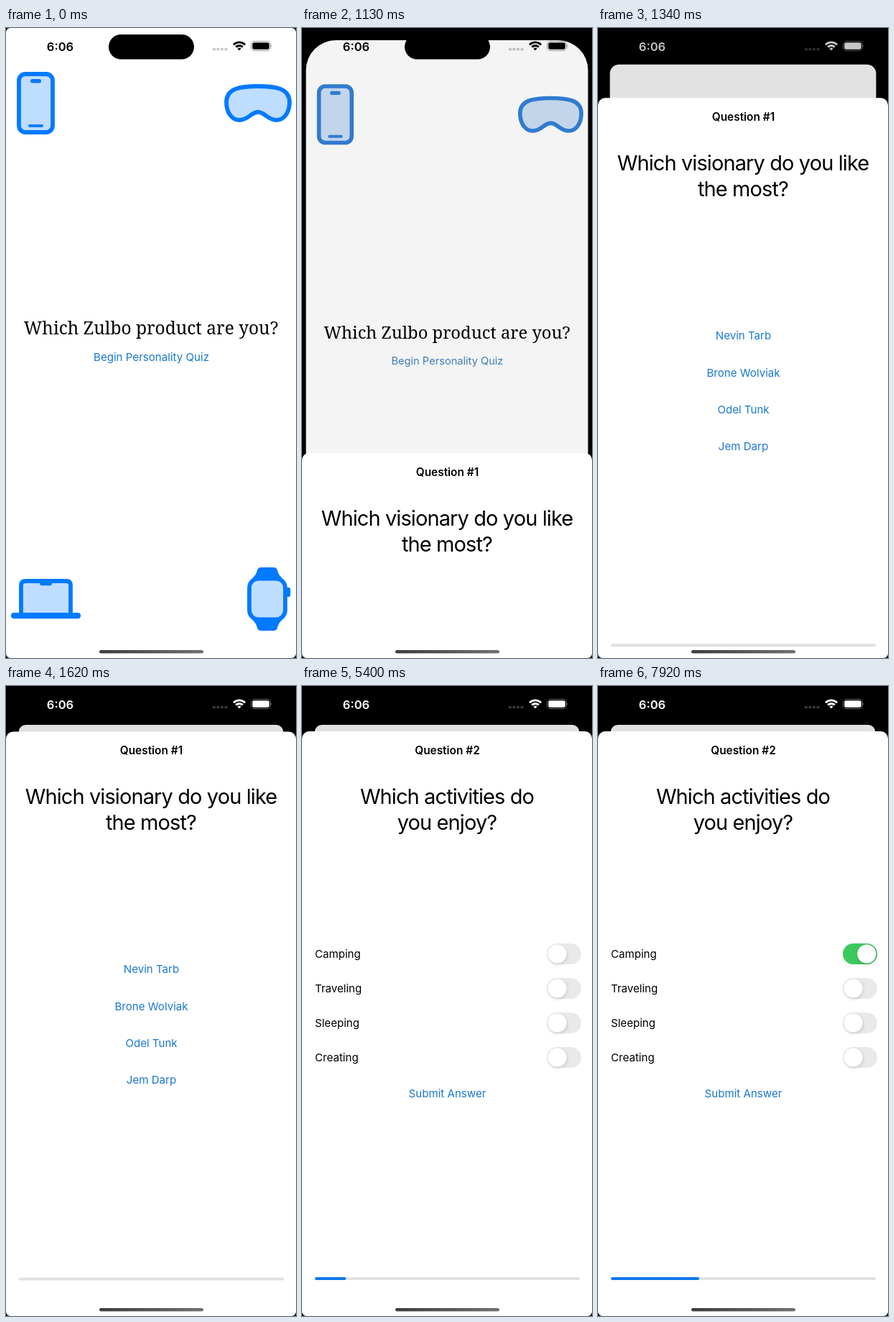
Recreate the animation shown at these times as an HTML page. Size 404 by 876 pixels, loop 7.99 s.

```html
<!DOCTYPE html>
<html lang="en">
<head>
<meta charset="utf-8">
<title>Personality quiz</title>
<style>
html, body { margin: 0; height: 100%; overflow: hidden; background: #000; }
svg { display: block; width: 100%; height: 100%; }
text { font: 15.1px Inter, sans-serif; font-optical-sizing: none; text-anchor: middle; }
.serif { font: 24.5px "Noto Serif", serif; }
.bar { font-size: 15.4px; font-weight: 600; }
.title { font-size: 29px; letter-spacing: -.9px; }
.label { text-anchor: start; }
.link { fill: #1a78d0; }
.glass { fill: currentColor; fill-opacity: .25; stroke: currentColor; stroke-width: 5.8; }
.knob { fill: #fff; filter: drop-shadow(1px 2px 2px #0002); }
</style>
</head>
<body>
<svg viewBox="0 0 404 876">
  <linearGradient id="shade"><stop stop-color="#3c3c3c"/><stop offset="1" stop-color="#707070"/></linearGradient>
  <rect width="404" height="876"/>
  <rect id="page" height="876" fill="#fff"/>
  <g id="home">
    <g fill="currentColor">
      <rect class="glass" x="18" y="64" width="47" height="81" rx="9"/>
      <rect x="34" y="71" width="15" height="5.4" rx="2.7"/>
      <rect x="31" y="134" width="21" height="4" rx="2"/>
      <path class="glass" d="M351 81C376 81 395 84 395 103C395 118 387 128 377 128C364 128 361 117 351 117C341 117 338 128 325 128C315 128 307 118 307 103C307 84 326 81 351 81Z"/>
      <path class="glass" d="M21 815V775Q21 769 27 769H84Q90 769 90 775V815"/>
      <rect x="47" y="768" width="17" height="7.3" rx="3"/>
      <rect x="7" y="813" width="97" height="8.3" rx="4.1"/>
      <rect class="glass" x="339" y="765.5" width="50" height="57" rx="13"/>
      <path id="strap" d="M343 764.5Q348 762 350 754Q351 750 355 750H373Q377 750 378 754Q380 762 385 764.5Z"/>
      <use href="#strap" transform="matrix(1 0 0 -1 0 1588)"/>
      <rect x="389" y="778" width="7.3" height="13" rx="3"/>
    </g>
    <text class="serif" x="202" y="426">Which Zulbo product are you?</text>
    <text id="begin" x="202.5" y="463">Begin Personality Quiz</text>
  </g>
  <rect id="dim" width="404" height="876"/>
  <g id="sheet">
    <rect y="63" width="404" height="840" rx="10" fill="#fff"/>
    <g id="first">
      <text class="bar" x="202.5" y="95">Question #1</text>
      <text class="title" x="202" y="164">Which visionary do you like</text>
      <text class="title" x="202" y="200">the most?</text>
      <g class="link">
        <text id="pick" x="202.5" y="399">Nevin Tarb</text>
        <text x="202.5" y="450.5">Brone Wolviak</text>
        <text x="202.5" y="502">Odel Tunk</text>
        <text x="202.5" y="553">Jem Darp</text>
      </g>
    </g>
    <g id="second">
      <text class="bar" x="202.5" y="95">Question #2</text>
      <text class="title" x="202" y="164">Which activities do</text>
      <text class="title" x="202" y="200">you enjoy?</text>
      <g id="rows"></g>
      <text class="link" x="202.5" y="572">Submit Answer</text>
    </g>
    <rect x="18" y="822" width="369" height="4" rx="2" fill="#e1e1e1"/>
    <rect id="progress" x="18" y="822" height="4" rx="2" fill="#1179ee"/>
  </g>
  <rect x="143" y="9" width="119" height="34.5" rx="17.25"/>
  <g id="status" fill="currentColor">
    <text x="75.5" y="31.6" style="font-size:16.5px;font-weight:600">6:06</text>
    <g id="signal" opacity=".22"></g>
    <g id="wifi" fill="none" stroke="currentColor"></g>
    <rect x="341.5" y="18.5" width="27" height="13" rx="4.2" fill="none" stroke="currentColor" opacity=".4"/>
    <rect x="343.2" y="20.2" width="23.6" height="9.6" rx="2.8"/>
    <path d="M369.6 23Q371.4 25 369.6 27Z" opacity=".5"/>
  </g>
  <rect x="130" y="865" width="145" height="4.4" rx="2.2" fill="url(#shade)"/>
  <rect x="-3" y="-3" width="410" height="882" rx="9" fill="none" stroke="#000" stroke-width="6"/>
</svg>
<script>
const LOOP = 7990, STEP = 70, GRID = 500;
const PRESS = 500, OPEN = 1060, PICK = 4490, NEXT = 5260, TOGGLE = 7430;
const GRAY = [142, 142, 147];
const $ = id => document.getElementById(id);
const clamp = x => Math.min(1, Math.max(0, x));
const set = (id, attrs) => {
  for (const k in attrs) $(id).setAttribute(k, attrs[k]);
};
const mix = (a, b, u) => `rgb(${a.map((v, i) => Math.round(v + (b[i] - v) * u))})`;
// Critically damped spring from 0 to 1
const spring = (ms, rate) => {
  const x = Math.max(0, ms) * rate / 1000;
  return 1 - (1 + x) * Math.exp(-x);
};
const smooth = u => u * u * (3 - 2 * u);

$('rows').innerHTML = ['Camping', 'Traveling', 'Sleeping', 'Creating'].map((name, i) => {
  const y = 372.5 + 48 * i;
  return `<text class="label" x="18" y="${y + 5.5}">${name}</text>
    <rect id="track${i}" x="341" y="${y - 14.5}" width="48" height="29" rx="14.5" fill="#e9e9ea"/>
    <circle id="knob${i}" class="knob" cx="355.5" cy="${y}" r="13"/>`;
}).join('');
$('signal').innerHTML = [0, 1, 2, 3].map(i =>
  `<circle cx="${290 + 5.5 * i}" cy="29.5" r="2.1"/>`).join('');
$('wifi').innerHTML = [[11.3, 2.9], [6.7, 2.9], [1.8, 3.6]].map(([r, w]) => {
  const d = r * Math.SQRT1_2, y = 31.2 - d;
  return `<path d="M${325 - d} ${y}A${r} ${r} 0 0 1 ${325 + d} ${y}" stroke-width="${w}"/>`;
}).join('');

function draw(t) {
  const open = spring(t - OPEN, 17.67);
  const scale = 1 - .087 * open;
  set('home', {
    transform: `translate(${202 * (1 - scale)} ${54 * open}) scale(${scale})`,
    color: mix([0, 122, 255], GRAY, open)
  });
  set('begin', {
    fill: mix([26, 120, 208], GRAY, open),
    opacity: t >= PRESS && t < OPEN ? .7 : 1
  });
  set('dim', { opacity: .12 * open });
  set('sheet', { transform: `translate(0 ${813 * (1 - open)})` });
  set('status', { color: mix([0, 0, 0], [255, 255, 255], clamp((t - OPEN - STEP) / 270)) });

  // The page edge trails its content slightly
  const back = spring(t - OPEN, 16.3), inset = 17.6 * back;
  set('page', {
    x: inset, y: 54 * back, width: 404 - 2 * inset,
    rx: back ? 56 - 46 * back : 0
  });

  const next = t >= NEXT;
  set('first', { display: next ? 'none' : 'inline' });
  set('second', { display: next ? 'inline' : 'none' });
  set('pick', { opacity: t >= PICK ? .65 : 1 });
  set('progress', { width: 123 * smooth(clamp((t - NEXT) / 350)) });

  const on = spring(t - TOGGLE, 14);
  set('track0', { fill: mix([233, 233, 234], [60, 200, 94], on) });
  set('knob0', { cx: 355.5 + 19 * on });
}

const start = performance.now();
function tick() {
  const t = (performance.now() - start) % LOOP;
  draw(GRID + Math.floor((t - GRID) / STEP) * STEP);
  requestAnimationFrame(tick);
}
tick();
</script>
</body>
</html>
```
